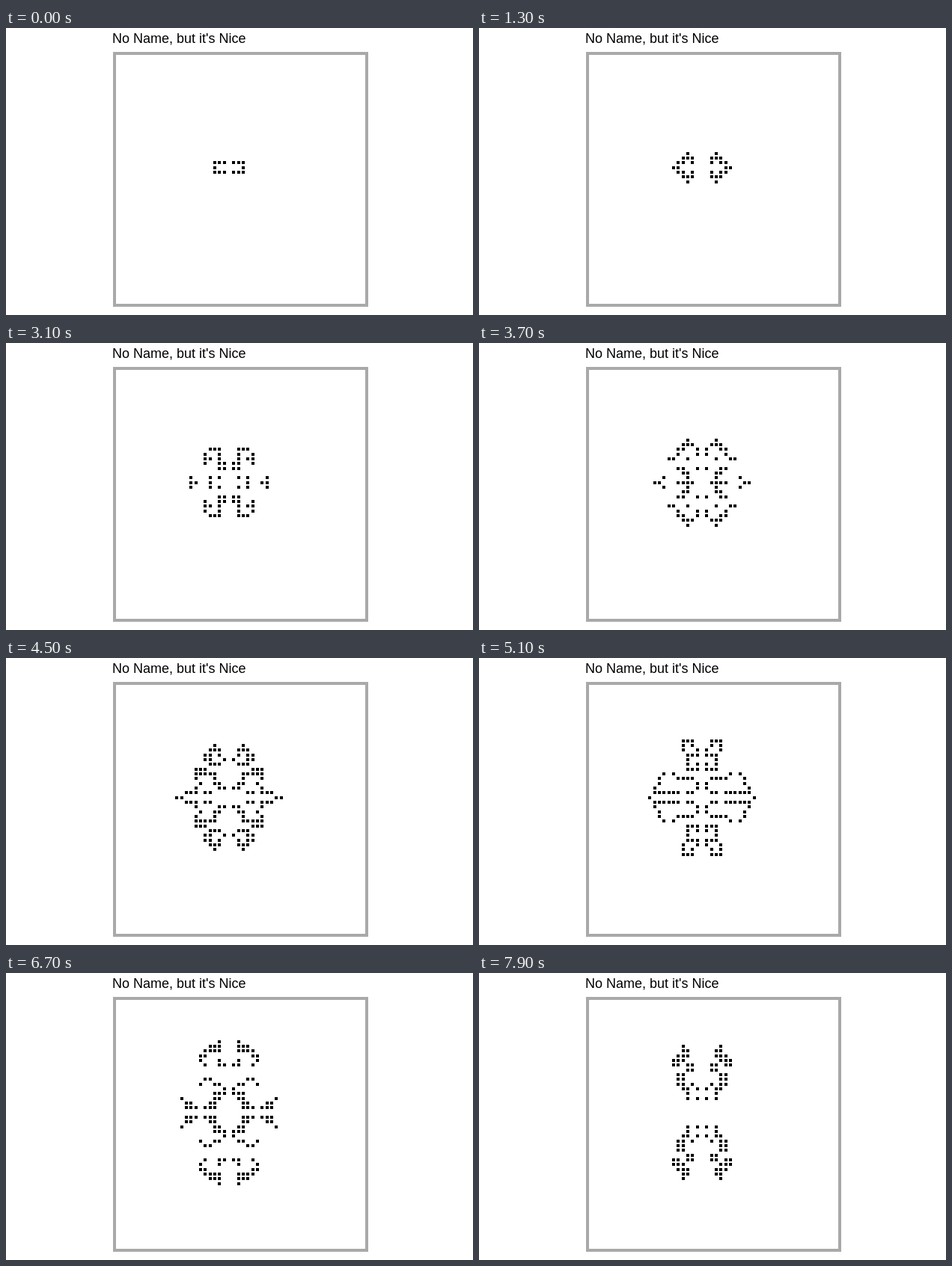
Write an HTML page that moves like this. It is 624 px wide and 384 px high and loops after 8 s.

```html
<!DOCTYPE html>
<html lang="en">
<head>
<meta charset="utf-8">
<title>Cellular automaton</title>
<style>
  html, body { margin: 0; width: 100%; height: 100%; overflow: hidden; background: #fff; }
  svg { display: block; }
  text { font: 18px "Liberation Sans", Arial, sans-serif; fill: #000; }
</style>
</head>
<body>
<svg width="624" height="384" viewBox="0 0 624 384">
  <text x="142" y="20">No Name, but it's Nice</text>
  <rect x="145" y="34" width="337" height="337" fill="none" stroke="#a9a9a9" stroke-width="4"/>
  <path id="cells" shape-rendering="crispEdges"/>
</svg>
<script>
const LOOP = 8000, STEP = 200, FIRST = 100;
const PITCH = 19 / 3, SIZE = 4, LEFT = 296, TOP = 554 / 3;
const SEED = ["###.###", "#.....#", "###.###"];

// A generation is a set of "x,y" keys, centred on 0,0.
function parse(rows) {
  const live = new Set();
  rows.forEach((row, y) => [...row].forEach((c, x) => {
    if (c === "#") live.add(`${x - 3},${y - 1}`);
  }));
  return live;
}

function evolve(live) {
  const counts = new Map();
  for (const key of live) {
    const [x, y] = key.split(",").map(Number);
    for (let dx = -1; dx <= 1; dx++) {
      for (let dy = -1; dy <= 1; dy++) {
        if (!dx && !dy) continue;
        const near = `${x + dx},${y + dy}`;
        counts.set(near, (counts.get(near) || 0) + 1);
      }
    }
  }
  const next = new Set();
  for (const [key, n] of counts) {
    if (n === 3 || (n === 2 && live.has(key))) next.add(key);
  }
  return next;
}

function outline(live) {
  return [...live].map(key => {
    const [x, y] = key.split(",").map(Number);
    const px = Math.round(LEFT + x * PITCH), py = Math.round(TOP + y * PITCH);
    return `M${px} ${py}h${SIZE}v${SIZE}h-${SIZE}z`;
  }).join("");
}

const shapes = [];
for (let live = parse(SEED), i = 0; i <= LOOP / STEP; i++, live = evolve(live)) {
  shapes.push(outline(live));
}

const cells = document.getElementById("cells");
const start = performance.now();
let shown = -1;

function draw() {
  const t = Math.max(0, performance.now() - start) % LOOP;
  const gen = Math.floor((t + STEP - FIRST) / STEP);
  if (gen !== shown) cells.setAttribute("d", shapes[shown = gen]);
  requestAnimationFrame(draw);
}
draw();
</script>
</body>
</html>
```
